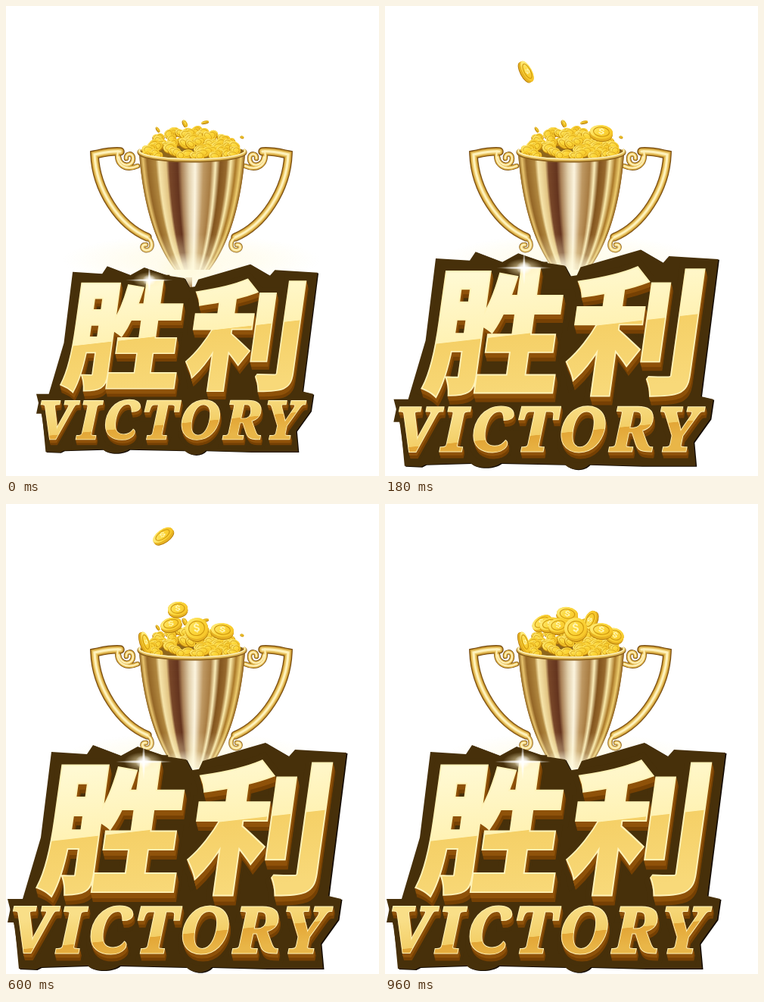
Animation of 493 by 620 pixels, one loop 0.99 s. Source, as an HTML page with a canvas:

```html
<!DOCTYPE html>
<html lang="zh-CN">
<head>
<meta charset="utf-8">
<title>胜利 VICTORY</title>
<style>
  html, body { margin: 0; width: 100%; height: 100%; overflow: hidden; background: #fff; }
  canvas { display: block; }
</style>
</head>
<body>
<canvas id="stage" width="493" height="620" aria-label="胜利 VICTORY"></canvas>
<script>
const W = 493, H = 620, LOOP = 990, STEP = 30, FALL = 1.1;
const stage = document.getElementById('stage').getContext('2d');
let c = stage;

function layer(draw) {
  const canvas = document.createElement('canvas');
  canvas.width = W;
  canvas.height = H;
  c = canvas.getContext('2d');
  draw();
  c = stage;
  return canvas;
}

function seeded(seed) {
  return () => (seed = (seed * 16807) % 2147483647) / 2147483647;
}

function gradient(x0, y0, x1, y1, ...stops) {
  const g = c.createLinearGradient(x0, y0, x1, y1);
  for (const [at, color] of stops) g.addColorStop(at, color);
  return g;
}

function ellipse(x, y, rx, ry, fill) {
  c.beginPath();
  c.ellipse(x, y, rx, ry, 0, 0, 7);
  c.fillStyle = fill;
  c.fill();
}

function glow(x, y, rx, ry, rgb, alpha) {
  c.save();
  c.translate(x, y);
  c.scale(rx, ry);
  const g = c.createRadialGradient(0, 0, 0, 0, 0, 1);
  g.addColorStop(0, `rgba(${rgb},${alpha})`);
  g.addColorStop(0.45, `rgba(${rgb},${alpha * 0.7})`);
  g.addColorStop(1, `rgba(${rgb},0)`);
  ellipse(0, 0, 1, 1, g);
  c.restore();
}

// ---- coins ----
function coin(x, y, rx, ry, degrees) {
  c.save();
  c.translate(x, y);
  c.rotate(degrees * Math.PI / 180);
  const depth = Math.min(4, rx * 0.27);
  for (let d = depth; d > 0; d -= 0.5) ellipse(0, d, rx, ry, d > depth - 1 ? '#b57c0c' : '#e6b223');
  ellipse(0, 0, rx, ry, gradient(-rx, -ry, rx, ry, [0, '#fff08c'], [0.45, '#fcd83c'], [1, '#f5c024']));
  c.beginPath();
  c.ellipse(0, 0, rx * 0.7, ry * 0.68, 0, 0, 7);
  c.lineWidth = rx > 10 ? 1.1 : 0.7;
  c.strokeStyle = '#cf970f';
  c.stroke();
  if (rx > 10) {
    c.scale(1, ry / rx);
    c.fillStyle = '#fff6b4';
    c.font = `bold ${rx * 1.05}px Roboto, sans-serif`;
    c.textAlign = 'center';
    c.textBaseline = 'middle';
    c.fillText('$', 0, 0);
  }
  c.restore();
}

// x, seen: [time, y, rx, ry, angle], rest: [x, y, rx, ry, angle], back to front
const drops = [
  { x: 241, seen: [870, 73, 14, 9, -45], rest: [241, 145, 14, 9, 8], top: -20 },
  { x: 270, seen: [720, 121, 15, 8, -70], rest: [271, 153, 13, 7, -65] },
  { x: 207, seen: [600, 41, 15, 7, -35], rest: [207, 156, 14, 8, -32] },
  { x: 218, seen: [240, 39, 13, 8, -25], rest: [218, 158, 14, 8, -14] },
  { x: 227, seen: [600, 138, 13, 9, -5], rest: [229, 160, 13, 9, -8] },
  { x: 188, seen: [240, 152, 15, 6, 62], rest: [185, 182, 14, 5, 72] },
  { x: 252, seen: [450, 117, 15, 14, 15], rest: [252, 164, 15, 14, -10] },
  { x: 300, seen: [720, 89, 13, 10, 0], rest: [304, 173, 12, 9, 20] },
  { x: 285, seen: [120, 105, 15, 9, 0], rest: [286, 166, 15, 9, 6] }
];

function drop({ x, seen, rest, top = 39 }, t) {
  const [time, y0, ...pose] = seen;
  const y = y0 + (t - time) * FALL;
  if (y < top) return;
  const k = Math.max(0, Math.min(1, (y - y0) / (rest[1] - y0)));
  const mix = (a, b) => a + (b - a) * k;
  coin(mix(x, rest[0]), Math.min(y, rest[1]), ...pose.map((p, i) => mix(p, rest[i + 2])));
}

function heap() {
  ellipse(246, 193, 70, 11, '#8f671c');
  const random = seeded(77), coins = [];
  for (let i = 0; i < 100; i++) {
    const u = random() * 2 - 1;
    const height = 34 * Math.pow(1 - u * u, 0.45) * (1 - 0.15 * u);
    coins.push([247 + 63 * u, 198 - height * random(), 5.5 + random() * 3, 4 + random() * 2, random() * 90 - 45]);
  }
  coins.sort((a, b) => a[1] - b[1]);
  coin(201, 163, 4, 1.5, 60);
  coin(237, 155, 5, 2.5, 65);
  coin(263, 153, 5, 1.5, -12);
  coin(312, 173, 2.5, 1.5, 20);
  for (const one of coins) coin(...one);
}

// ---- cup ----
const metal = [
  [0, '#8f631c'], [0.03, '#e8c46e'], [0.07, '#946626'], [0.15, '#b0863e'], [0.18, '#f6e4aa'], [0.25, '#e2c482'],
  [0.28, '#784628'], [0.36, '#64341e'], [0.4, '#aa8258'], [0.47, '#e2d0ac'], [0.53, '#fcf4de'], [0.61, '#be9862'],
  [0.68, '#a87c42'], [0.725, '#faecb8'], [0.77, '#82541e'], [0.83, '#96682c'], [0.87, '#faeaaa'], [0.92, '#aa7828'],
  [0.965, '#eece70'], [1, '#8c5c18']
];

function body() {
  c.save();
  c.beginPath();
  c.ellipse(246, 193, 70, 11, 0, 0, Math.PI);
  c.lineTo(176, 348);
  c.lineTo(316, 348);
  c.clip();
  c.fillStyle = gradient(-1, 0, 1, 0, ...metal);
  const bezier = (s, a, b, p, d) =>
    a * (1 - s) ** 3 + 3 * b * s * (1 - s) ** 2 + 3 * p * s * s * (1 - s) + d * s ** 3;
  for (let s = 0; s <= 1; s += 0.004) {
    c.setTransform(bezier(s, 70, 66, 52, 22), 0, 0, 1, 246, bezier(s, 193, 250, 310, 348));
    c.fillRect(-1, 0, 2, 1.5);
  }
  c.restore();
  for (const [color, width, dy] of [['#8e621c', 5, 1], ['#e2bd5c', 3.5, 0], ['#fff3b8', 1.5, -1]]) {
    c.beginPath();
    c.ellipse(246, 192 + dy, 70, 11, 0, -0.15, Math.PI + 0.15);
    c.strokeStyle = color;
    c.lineWidth = width;
    c.stroke();
  }
}

function handle() {
  const arm = new Path2D('M151 192 C138 191 127 194 117 196 C119 242 149 289 187 305');
  const curls = new Path2D('M148 191 C144 210 158 218 174 211 M149 199 C151 213 168 213 168 201 C168 193 158 194 159 201' +
    ' M184 304 C196 308 195 324 184 322 C178 320 180 314 185 315');
  c.lineCap = 'round';
  c.lineJoin = 'miter';
  for (const [color, width] of [['#74490f', 1], ['#c8962f', 0.8], ['#ecca6c', 0.56], ['#fff2bc', 0.26]]) {
    c.strokeStyle = color;
    c.lineWidth = 11.5 * width;
    c.stroke(arm);
    c.lineWidth = 6.5 * width;
    c.stroke(curls);
  }
}

function cup() {
  c.fillStyle = '#8a5a20';
  c.fillRect(237, 358, 9, 24);
  handle();
  c.save();
  c.translate(490, 0);
  c.scale(-1, 1);
  handle();
  c.restore();
  body();
  glow(245, 335, 170, 34, '255,246,200', 0.4);
  glow(242, 351, 48, 26, '255,250,222', 1);
}

// ---- title ----
function hanzi(op, dx = 0, dy = 0) {
  c.save();
  c.transform(1, 0, -0.14, 1, 0.14 * 425 + dx, dy);
  c.font = '700 186px "Noto Sans CJK SC", "Noto Sans CJK", sans-serif';
  c[op]('胜', 144, 498);
  c[op]('利', 338, 498);
  c.restore();
}

function latin(op, dx = 0, dy = 0) {
  c.font = 'italic 700 84px "Noto Serif", serif';
  c.letterSpacing = '6px';
  c[op]('VICTORY', 216 + dx, 592 + dy);
  c.letterSpacing = '0px';
}

function outlined(text, color, width, dx, dy) {
  c.strokeStyle = c.fillStyle = color;
  c.lineWidth = width;
  text('strokeText', dx, dy);
  text('fillText', dx, dy);
}

function lettering(text, depth, rim, face) {
  for (let d = depth; d > 0; d--) outlined(text, d > depth * 0.6 ? '#764104' : '#8f520a', rim, d * 0.25, d);
  outlined(text, '#fff3b9', rim, 0, 0);
  outlined(text, face, rim * 0.35, 0, 0);
}

const DARK = '#47300a';
const plate = new Path2D('M60 327 L107 330 L115 318 L152 332 L174 320 L212 333 L238 337 L246 352 L254 352 L260 339' +
  ' L343 315 L374 333 L382 324 L450 328 L426 517 L443 521 L439 548 L416 580 L419 613 L344 613 L272 611' +
  ' C264 620 248 620 238 611 L150 609 C140 617 116 617 108 609 L46 611 L40 614 L17 613 L12 560 L2 521 L22 521 L46 440 Z');

function sparkle(x, y) {
  glow(x, y, 26, 13, '255,240,190', 0.7);
  glow(x, y, 11, 9, '255,255,255', 1);
  glow(x, y, 38, 2.2, '255,255,255', 1);
  glow(x, y, 2.2, 24, '255,255,255', 1);
}

function title(t) {
  const k = 0.83 + 0.17 * Math.min(1, t / 240);
  c.save();
  c.translate(225.5, 467);
  c.scale(k, k);
  c.translate(-225.5, -467);
  c.textAlign = 'center';
  c.textBaseline = 'alphabetic';
  c.lineJoin = 'miter';
  c.miterLimit = 2;

  c.save();
  c.translate(1.5, 1);
  c.fillStyle = '#120a02';
  c.fill(plate);
  c.restore();
  c.fillStyle = DARK;
  c.fill(plate);
  outlined(hanzi, DARK, 22, 0, 0);
  outlined(latin, DARK, 14, 0, 9);

  lettering(hanzi, 12, 6, gradient(236, 333, 257, 515,
    [0, '#fff9d2'], [0.495, '#fff2b4'], [0.5, '#f5d067'], [1, '#f8d979']));
  lettering(latin, 9, 3, gradient(215, 530, 221, 594,
    [0, '#f9df88'], [0.6, '#f3cf68'], [0.61, '#e3a636'], [1, '#e9b648']));
  sparkle(182, 340);
  c.restore();
}

const heapLayer = layer(heap), cupLayer = layer(cup);

function frame() {
  const t = Math.floor(performance.now() % LOOP / STEP + 0.01) * STEP % LOOP;
  c.fillStyle = '#fff';
  c.fillRect(0, 0, W, H);
  c.drawImage(heapLayer, 0, 0);
  for (const one of drops) drop(one, t);
  c.drawImage(cupLayer, 0, 0);
  title(t);
  requestAnimationFrame(frame);
}
frame();
</script>
</body>
</html>
```
